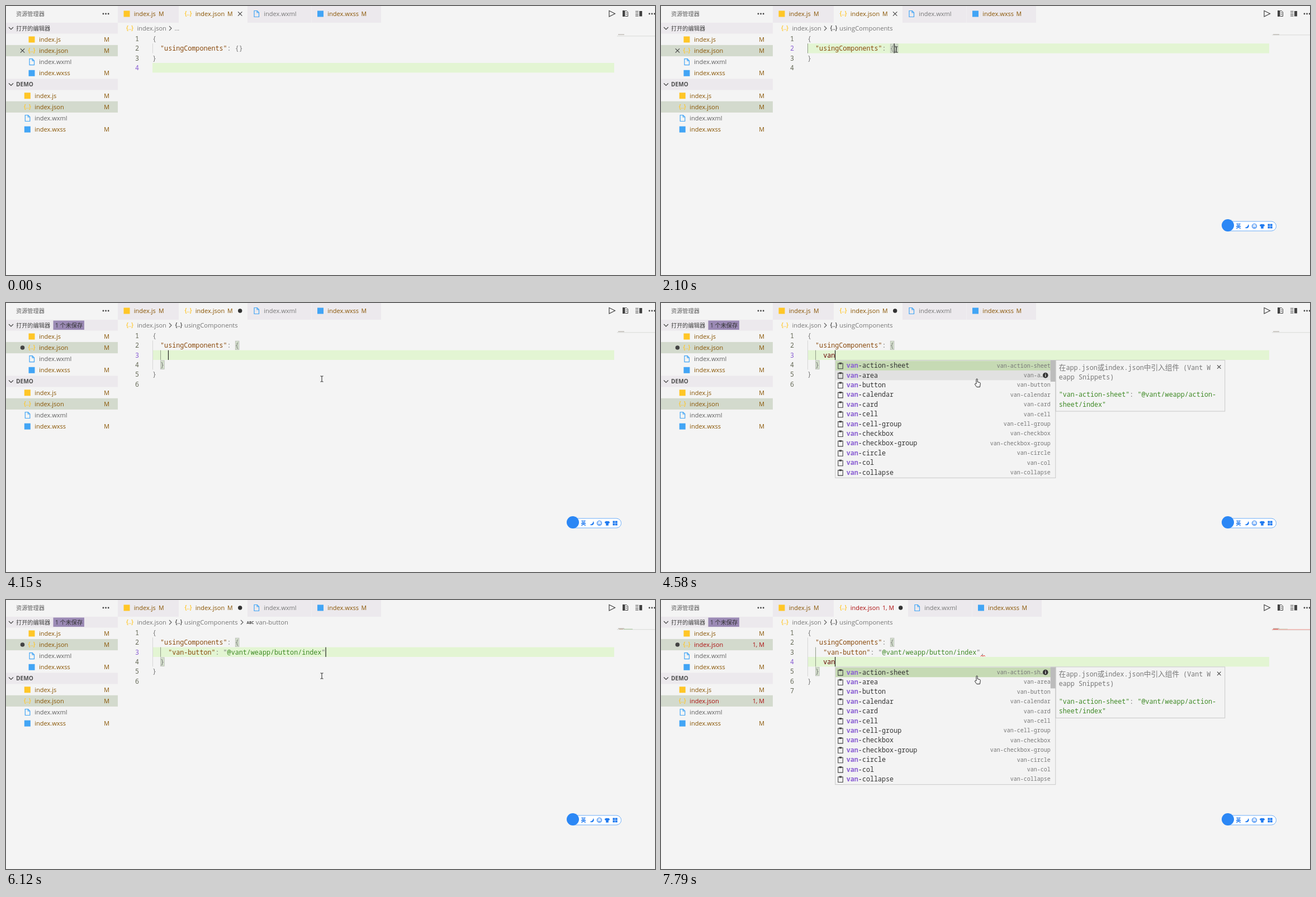
An HTML page for the animation above (8000 ms loop, 1161 px wide and 482 px high).

```html
<!DOCTYPE html>
<html lang="zh">
<head>
<meta charset="utf-8">
<style>
  html, body { margin: 0; width: 100%; height: 100%; overflow: hidden; background: #f4f4f4; }
  svg { display: block; }
  text { white-space: pre; font-family: "Open Sans", "Noto Sans CJK SC", "Noto Sans CJK", sans-serif; }
  .code { font-family: "Noto Sans Mono", "Noto Sans CJK SC", "Noto Sans CJK", monospace; }
</style>
</head>
<body>
<svg id="stage" width="1161" height="482" viewBox="0 0 1161 482"></svg>
<script>
const LOOP = 8000, ROW = 17.4, CHAR = 7.04, LEFT = 262, TOP = 49.8;
const BROWN = '#895503', RED = '#ad0f0f', GRAY = '#616161', INK = '#333', PUNCT = '#777',
      KEY = '#8a4a0d', GREEN = '#3f8a26', PURPLE = '#8a5fd3', YELLOW = '#ffc627', BLUE = '#42a5f5';

const FULL_LIST = ['action-sheet', 'area', 'button', 'calendar', 'card', 'cell', 'cell-group',
  'checkbox', 'checkbox-group', 'circle', 'col', 'collapse'];
// Square brackets mark the matched letters.
const SHORT_LIST = {
  vanb: ['[van]-[b]utton', '[van]-su[b]mit-bar', '[van]-goods-action-[b]utton', '[van]-check[b]ox-group'],
  vanbu: ['[van]-[bu]tton', '[van]-s[ub]mit-bar', '[van]-goods-action-[bu]tton', '[van]-check[b]ox-gro[u]p', '"[vanbu]"']
};
const TYPED = [[0, ''], [4430, 'v'], [4580, 'van'], [4900, 'vanb'], [5020, 'vanbu'], [5720, ''],
  [7540, 'v'], [7660, 'va'], [7790, 'van']];
const CARET = [[0, 0], [1980, 1], [2500, 0], [3050, 1], [3630, 0], [4150, 1], [6680, 0], [6830, 1]];
const ERRORS = [[0, 0], [5140, 2], [6000, 0], [7660, 1]];
const MOUSE = [[0, null], [560, [369, 147]], [680, [330, 118]], [800, [265, 65]], [920, [344, 69]],
  [1070, [382, 75]], [1200, [413.5, 80.5]], [1330, [417, 79]], [1450, [420, 78]], [1580, [421, 78]],
  [2500, [558, 136]], [2650, [565, 136]]];

const at = (keys, t) => keys.filter(k => k[0] <= t).pop()[1];
const rect = (x, y, w, h, fill, more = '') => `<rect x="${x}" y="${y}" width="${w}" height="${h}" fill="${fill}" ${more}/>`;
const disc = (x, y, r, fill) => `<circle cx="${x}" cy="${y}" r="${r}" fill="${fill}"/>`;
const line = (d, stroke, w = 1, fill = 'none') => `<path d="${d}" stroke="${stroke}" stroke-width="${w}" fill="${fill}"/>`;
const label = (x, y, s, fill, size = 11, more = '') =>
  `<text x="${x}" y="${y}" fill="${fill}" font-size="${size}" ${more}>${s}</text>`;
const cjk = s => String(s).replace(/[\u4e00-\u9fff]+/g, '<tspan font-size="12.7" font-weight="300">$&</tspan>');
const span = (s, fill) => `<tspan fill="${fill}">${s}</tspan>`;
const code = (x, y, s, fill = INK, size = 11.73, more = '') => label(x, y, cjk(s), fill, size, 'class="code" ' + more);
const END = 'text-anchor="end"', MID = 'text-anchor="middle"', BOLD = 'font-weight="700"';

const cross = (x, y, r = 3.7) => line(`M${x - r} ${y - r}l${2 * r} ${2 * r}m0 ${-2 * r}l${-2 * r} ${2 * r}`, '#444', 1.1);
const dots = (x, y) => [0, 4.6, 9.2].map(d => disc(x + d, y, 1.4, '#444')).join('');
const down = (x, y) => line(`M${x - 4} ${y - 2}l4 4 4-4`, '#444', 1.2);
const right = (x, y) => line(`M${x - 2} ${y - 4}l4 4-4 4`, '#616161', 1.2);
const braces = (x, y, fill) => label(x, y + 3.2, '{..}', fill, 10, MID + ' font-weight="600"');
const squiggle = (x, y, w) => {
  let d = `M${x} ${y}`;
  for (let i = 0; i < w / 2; i++) d += `l2 ${i % 2 ? 2 : -2}`;
  return line(d, '#e51400', 1);
};

const icons = {
  js: (x, y) => rect(x - 5.5, y - 5.5, 11, 11, YELLOW),
  json: (x, y) => braces(x, y, YELLOW),
  wxml: (x, y) => line(`M${x - 4} ${y - 5.5}h5.2l3.3 3.3v7.7h-8.5zM${x + 1} ${y - 5.5}v3.5h3.5`, BLUE, 1.2),
  wxss: (x, y) => rect(x - 5.5, y - 5.5, 11, 11, BLUE)
};
const KINDS = Object.keys(icons);

function sidebar(s) {
  let out = label(18, 17.5, '资源管理器', GRAY, 10.2) + dots(174, 14) +
    rect(0, 30, 200, 19.5, '#ece9ed') + rect(0, 130.5, 200, 20, '#ece9ed') +
    down(9, 40) + down(9, 140.5) +
    label(18, 44, '打开的编辑器', '#444', 10.2, 'font-weight="500"') +
    label(18, 144.3, 'DEMO', '#505050', 10.2, BOLD);
  if (s.dirty) out += rect(84.5, 31.5, 55.5, 16.5, '#9b8ab5') + label(88, 43.8, '1 个未保存', INK, 10.2);
  for (const [top, x] of [[60, 59], [160.8, 51.3]]) {
    KINDS.forEach((kind, i) => {
      const y = top + i * 20.1, json = kind == 'json';
      const color = kind == 'wxml' ? GRAY : json && s.errors ? RED : BROWN;
      if (json) out += rect(0, y - 10.2, 200, 20.2, '#d3dacd');
      out += icons[kind](x - 13, y) + label(x, y + 4, 'index.' + kind, color);
      if (kind != 'wxml') out += label(185, y + 4, json && s.errors ? s.errors + ', M' : 'M', color, 10.8, END);
    });
  }
  return out + (s.dirty ? disc(29.5, 80, 3.8, '#444') : cross(29.5, 80));
}

const toolbar = line('M1079 8.5l10.5 5.2-10.5 5.3z', '#444', 1.2) +
  rect(1103, 8, 4.5, 11, '#444') + line('M1108 8.5h2l2.5 2.5v7.5h-4.5M1109 12h2m-2 3h2', '#444') +
  line('M1126 9.5h5.5m-5.5 3h5.5m-5.5 3h5.5m-5.5 2.5h5.5', '#444') + rect(1133, 9, 5, 9.5, '#444') +
  dots(1151, 14);

function tabs(s) {
  const shift = [0, 10, 11.5][s.errors];
  const color = s.errors ? RED : BROWN;
  return rect(200, 0, 109, 30, '#ece9ed') +
    rect(432 + shift, 0, 114.5, 30, '#ece9ed') + rect(547 + shift, 0, 124, 30, '#ece9ed') +
    icons.js(216, 14) + label(228.8, 18, 'index.js', BROWN) + label(273, 18, 'M', BROWN, 10.6) +
    icons.json(326, 14) + label(338.8, 18, 'index.json', color) +
    label(396, 18, s.errors ? s.errors + ', M' : 'M', color, 10.6) +
    (s.dirty ? disc(418.7 + shift, 14, 3.7, INK) : cross(418.7, 14)) +
    icons.wxml(448 + shift, 14) + label(461.3 + shift, 18, 'index.wxml', '#777') +
    icons.wxss(562.5 + shift, 14) + label(575.3 + shift, 18, 'index.wxss', BROWN) +
    label(635.5 + shift, 18, 'M', BROWN, 10.6) + toolbar;
}

function breadcrumb(s) {
  let out = braces(221.5, 40, YELLOW) + label(234.5, 44.3, 'index.json', '#777') + right(294, 40);
  if (!s.focused) return out + label(301.5, 44, '...', '#777');
  out += braces(309, 40, '#444') + label(319, 44.3, 'usingComponents', '#777', 11.25);
  if (s.member) out += right(422, 40) + label(437, 42.6, 'ABC', '#444', 6.5, MID + ' ' + BOLD) +
    label(446.8, 44.3, 'van-button', '#777', 11.3);
  return out;
}

function editor(s) {
  const x = col => LEFT + col * CHAR, top = n => TOP + (n - 1) * ROW;
  const box = (n, col) => rect(x(col) + .5, top(n) + 1, CHAR - .5, ROW - 2, '#d4e0cc', 'stroke="#b5b8b2" stroke-width=".8"');
  const guide = (col, a, b, on) => rect(x(col), top(a), 1, (b - a + 1) * ROW, on ? '#8f9a86' : '#d6d6d6');
  const brown = t => span(t, KEY), punct = t => span(t, PUNCT);
  const pair = punct('    ') + brown('"van-button"') + punct(': "') + span('@vant/weapp/button/index', GREEN) +
    punct('"' + (s.comma ? ',' : ''));
  const head = punct('  ') + brown('"usingComponents"') + punct(': {' + (s.dirty ? '' : '}'));
  const word = span('    ' + s.typed, '#660000');
  const inner = !s.dirty ? [] : [...(s.full ? [pair] : []), ...(!s.full || s.second ? [word] : []), punct('  }')];
  const lines = [punct('{'), head, ...inner, punct('}'), ''];
  const close = lines.length - 2;

  let out = rect(LEFT, top(s.line), 826, ROW, '#e3f5d3');
  out += s.dirty
    ? guide(0, 2, close) + guide(2, 3, close - 1, true) + box(2, 21) + box(close, 2)
    : guide(0, 2, 2, s.focused) + (s.focused ? box(2, 21) + box(2, 22) : '');
  lines.forEach((t, i) => {
    const y = top(i + 1) + 13;
    out += code(238, y, i + 1, i + 1 == s.line ? PURPLE : '#666a58', 11.73, END) + code(LEFT, y, t);
  });
  if (s.errors == 2) out += squiggle(x(4), top(3) + 16.5, 36) + squiggle(x(2), top(close) + 16.5, 7);
  if (s.commaError) out += squiggle(x(44), top(3) + 16.5, 7);
  if (s.caret) out += rect(x(s.col) - .3, top(s.line), 1.2, ROW, '#222');
  return out + minimap(s);
}

function minimap(s) {
  let out = rect(1093, 49.4 + s.line, 68, 1, '#d8dad6') + rect(1095, 50.6, 11, 1, '#a9a39b');
  if (s.full) out += rect(1097, 51.7, 7, 1, '#c1a789') + rect(1105, 51.7, 16, 1, '#a3c396');
  if (s.errors) out += rect(1093, 52.3, 68, 1.2, '#f3a59e') + rect(1095, 51.7, 9, 1.2, '#e0605a');
  return out;
}

function popup(s) {
  const short = SHORT_LIST[s.typed];
  const items = short || FULL_LIST.map(n => `[${s.typed}]${'van-'.slice(s.typed.length)}${n}`);
  const x = LEFT + s.col * CHAR + .5, y = TOP + s.line * ROW + .5, h = items.length * ROW + 2;
  const hover = s.line == 3 ? 1 : 0;
  let out = rect(x, y, 394, h, '#f3f3f3', 'stroke="#c8c8c8"');
  items.forEach((item, i) => {
    const cy = y + 1 + (i + .5) * ROW, name = item.replace(/[[\]]/g, ''), snippet = name[0] != '"';
    const fill = i == 0 ? '#c6dab4' : i == hover ? '#e1e1e1' : '';
    if (fill) out += rect(x + .5, cy - ROW / 2, 393, ROW, fill);
    out += snippet
      ? line(`M${x + 5} ${cy - 4}h8.5v9.5h-8.5z`, '#444', 1.1) + rect(x + 7, cy - 5.5, 4.5, 3, '#444')
      : line(`M${x + 5} ${cy - 3}l2 2 2-2-2-2a3.2 3.2 0 0 1 3 4l4 4-1.6 1.6-4-4a3.2 3.2 0 0 1-4-3z`, '#444', 1, '#444');
    out += code(x + 20, cy + 4, item.replace(/\[(.*?)\]/g, `<tspan fill="${PURPLE}" font-weight="700">$1</tspan>`));
    if (!snippet) return;
    if (i != hover) out += code(x + 385, cy + 3.3, name, '#777', 10, END);
    else out += code(x + 373, cy + 3.3, name.slice(0, -3) + '…', '#777', 10, END) +
      disc(x + 376, cy, 4.8, INK) + rect(x + 375.4, cy - .8, 1.3, 3.4, '#fff') + rect(x + 375.4, cy - 2.9, 1.3, 1.3, '#fff');
  });
  if (!short) out += rect(x + 385, y + .5, 9, 38, '#bcbcbc');

  const dx = x + 394.5, text = (row, t, fill = PUNCT) => code(dx + 5.5, y + 17 + row * 17.2, t, fill);
  const tail = short
    ? text(2.84, span('"van-button"', GREEN) + ': ' + span('"@vant/weapp/button/index"', GREEN))
    : text(2.84, span('"van-action-sheet"', GREEN) + ': ' + span('"@vant/weapp/action-', GREEN)) + text(3.84, 'sheet/index"', GREEN);
  return out + rect(dx, y, 302.5, short ? 74 : 91.5, '#f3f3f3', 'stroke="#c8c8c8"') +
    text(0, '在app.json或index.json中引入组件 (Vant W') + text(1, 'eapp Snippets)') + tail + cross(dx + 292, y + 12, 3.2);
}

const inputBar = rect(1005, 386, 95.5, 17, '#fff', 'rx="8.5" stroke="#6eaef8"') + disc(1014, 393, 11, '#2b87f5') +
  label(1033, 398.2, '英', '#1f7af0', 9, MID + ' ' + BOLD) +
  line('M1050.5 391a4 4 0 1 1-6 6 6 6 0 0 0 6-6z', 'none', 0, '#1f7af0') +
  line('M1057.5 394.5a4 4 0 1 1 8 0a4 4 0 1 1-8 0M1059.5 395.5q2 3 4 0', '#1f7af0', 1.2) +
  disc(1060, 393.4, .7, '#1f7af0') + disc(1063, 393.4, .7, '#1f7af0') +
  line('M1074 390.5q1.5 1.5 3 0l3.2 2-1.2 2.5-1.2-.5v4.2h-4.6v-4.2l-1.2.5-1.2-2.5z', 'none', 0, '#1f7af0') +
  [0, 1, 2, 3].map(i => rect(1085.5 + i % 2 * 4.4, 390.5 + (i >> 1) * 4.3, 3.8, 3.7, '#1f7af0')).join('');

function pointer([x, y], hand) {
  return hand
    ? line(`M${x - 1} ${y + 9}v-8a1.1 1.1 0 0 1 2.2 0v4.5l4 1q1.4.4 1.1 2l-.9 6h-5.6l-3.5-5q.3-1.8 2.7-.5z`, '#222', 1, '#fff')
    : line(`M${x - 2.5} ${y - 5}h2l.5.5.5-.5h2M${x} ${y - 5}v10M${x - 2.5} ${y + 5}h2l.5-.5.5.5h2`, '#222', 1);
}

function draw(t) {
  const s = {
    focused: t >= 1980, dirty: t >= 3180, full: t >= 5720, comma: t >= 6830, second: t >= 7090,
    member: t >= 6120 && t < 7390, commaError: t >= 7390,
    typed: at(TYPED, t), caret: at(CARET, t), errors: at(ERRORS, t)
  };
  s.line = !s.focused ? 4 : !s.dirty ? 2 : s.second ? 4 : 3;
  s.col = !s.dirty ? 22 : s.full && !s.second ? 44 + s.comma : 4 + s.typed.length;
  const mouse = at(MOUSE, t), hand = s.typed && !(t >= 5580 && t < 7540);
  return sidebar(s) + tabs(s) + breadcrumb(s) + editor(s) + (s.typed ? popup(s) : '') +
    (t >= 2100 ? inputBar : '') + (mouse ? pointer(mouse, hand) : '');
}

const stage = document.getElementById('stage');
let shown = '';
function frame(now) {
  const next = draw(now % LOOP);
  if (next != shown) stage.innerHTML = shown = next;
  requestAnimationFrame(frame);
}
frame(0);
</script>
</body>
</html>
```
